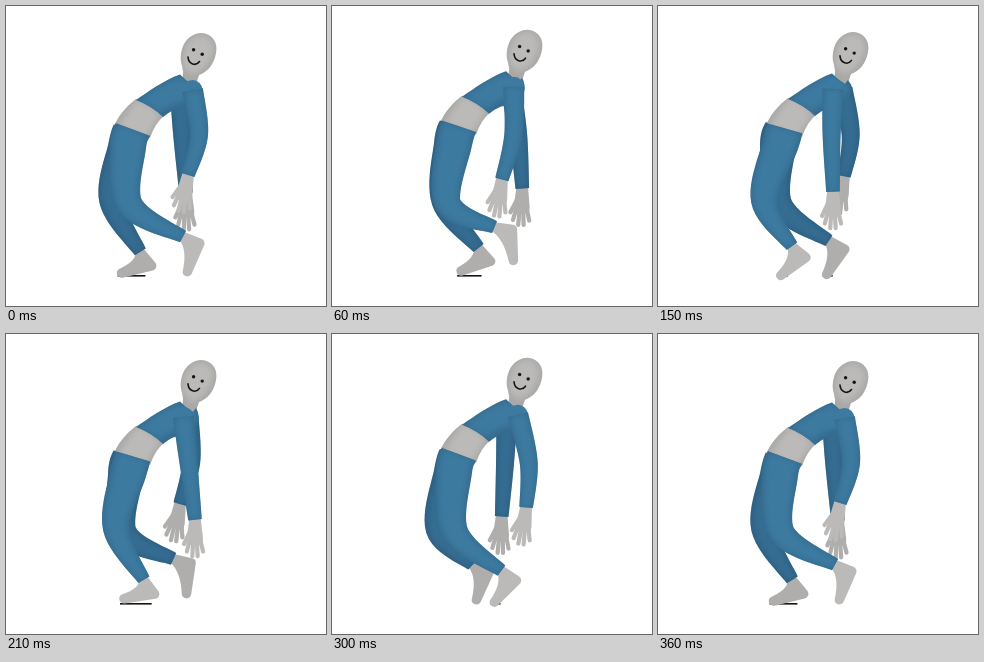
Animation, 320 px wide and 300 px high, one loop 390 ms. Source, as an HTML page with a canvas:

```html
<!DOCTYPE html>
<html lang="en">
<head>
<meta charset="utf-8">
<title>Backward-leaning walk</title>
<style>
  html, body { margin: 0; width: 100%; height: 100%; overflow: hidden; background: #fff; }
  canvas { display: block; }
</style>
</head>
<body>
<canvas id="stage" width="320" height="300"></canvas>
<script>
const ctx = document.getElementById('stage').getContext('2d');
const STEP = 30, STEPS = 13, CYCLE = 360;
const INK = '#151515';

// The far side lags half a cycle and swings a little less.
const NEAR = {
  lag: 0, shift: 0, reach: 1,
  cloth: { edge: '#346a8d', core: '#3d7aa0' },
  skin: { edge: '#a9a8a6', core: '#bbbab8' }
};
const FAR = {
  lag: Math.PI, shift: -2, reach: 0.85,
  cloth: { edge: '#2c5d7e', core: '#356c91' },
  skin: { edge: '#9d9c9a', core: '#afaeac' }
};

const { cos, sin, PI } = Math;
const rad = degrees => degrees * PI / 180;
const mix = (a, b, u) => a.map((v, i) => v + (b[i] - v) * u);
const polar = ([x, y], length, angle) => [x + length * cos(angle), y + length * sin(angle)];

function hermite(a, b, ma, mb, u) {
  const v = u * u, w = v * u;
  return (2 * w - 3 * v + 1) * a + (w - 2 * v + u) * ma
       + (3 * v - 2 * w) * b + (w - v) * mb;
}

// Outline of a tapered limb through [x, y, radius] points.
function tube(points, scale = 1) {
  const mid = [], n = points.length;
  for (let i = 0; i < n - 1; i++) {
    const p = points[Math.max(i - 1, 0)], a = points[i];
    const b = points[i + 1], q = points[Math.min(i + 2, n - 1)];
    for (let s = i ? 1 : 0; s <= 12; s++) {
      mid.push(a.map((v, c) => hermite(v, b[c], (b[c] - p[c]) / 2, (q[c] - v) / 2, s / 12)));
    }
  }
  const side = sign => mid.map(([x, y, r], i) => {
    const a = mid[Math.max(i - 1, 0)], b = mid[Math.min(i + 1, mid.length - 1)];
    const dx = b[0] - a[0], dy = b[1] - a[1], k = sign * r * scale / Math.hypot(dx, dy);
    return [x - dy * k, y + dx * k];
  });
  const path = new Path2D();
  [...side(1), ...side(-1).reverse()].forEach(point => path.lineTo(...point));
  path.closePath();
  return path;
}

// Flat fill with a soft lighter core.
function shade(path, color, core) {
  ctx.fillStyle = color.edge;
  ctx.fill(path);
  ctx.save();
  ctx.clip(path);
  ctx.filter = 'blur(3px)';
  ctx.fillStyle = color.core;
  ctx.fill(core);
  ctx.restore();
}

const limb = (points, color) => shade(tube(points), color, tube(points, 0.85));

function disc([x, y], r, color) {
  ctx.fillStyle = color;
  ctx.beginPath();
  ctx.arc(x, y, r, 0, PI * 2);
  ctx.fill();
}

function line(color, width, path) {
  ctx.strokeStyle = color;
  ctx.lineWidth = width;
  ctx.lineCap = ctx.lineJoin = 'round';
  ctx.stroke(path);
}

// The cuff travels a lopsided loop; the foot pitches up as it trails.
function legPose(side, phase) {
  const p = phase + side.lag;
  const x = (mean, amp, lead) => mean + side.shift + side.reach * amp * cos(p + lead);
  const knee = [x(115.5, 9.4, 0.44), 197 + 2 * cos(p)];
  const cuff = [x(155, 22.4, 0.18), 234.5 - 10.8 * cos(p - 0.79) + 4 * cos(2 * p + 0.32)];
  const pitch = 50 + 38 * cos(p - 0.8) - 10 * cos(2 * p);
  const heel = polar(cuff, 18, rad(58 - 0.55 * pitch));
  const toe = polar(heel, 31, rad(180 - pitch));
  const planted = cos(p - rad(240)) > -0.25;
  return { knee, cuff, heel, toe, pitch, planted };
}

// The arm swings against the leg and folds at the back of the swing.
function armPose(side, phase, bob) {
  const p = phase + side.lag;
  const x = (mean, amp, lead) => mean + side.shift + side.reach * amp * cos(p + lead);
  const shoulder = [x(181, 6, 0.4), 84 + bob];
  const elbow = [x(185, 12, 0.84), 129];
  const wrist = [x(182, 14, PI / 2), 178 - 9 * cos(p)];
  const tip = [wrist[0] - 3.5 - 4 * cos(p), wrist[1] + 39];
  return { shoulder, elbow, wrist, tip };
}

function shadow({ toe, pitch, planted }) {
  if (!planted) return;
  ctx.fillStyle = INK;
  ctx.fillRect(toe[0] - 4, 269, Math.max(10, 38 - 0.75 * pitch), 1.6);
}

function foot({ cuff, heel, toe }, skin) {
  const instep = mix(mix(cuff, toe, 0.5), heel, 0.5);
  const path = new Path2D();
  path.moveTo(...cuff);
  path.lineTo(...heel);
  path.lineTo(...toe);
  path.quadraticCurveTo(...instep, ...cuff);
  path.closePath();
  ctx.fillStyle = skin.core;
  ctx.fill(path);
  line(skin.core, 9.5, path);
}

function leg(side, pose, bob) {
  foot(pose, side.skin);
  limb([
    [127 + side.shift, 123.5 + bob, 18],
    [122 + side.shift, 141 + bob, 18],
    [...pose.knee, 13],
    [...pose.cuff, 6.4]
  ], side.cloth);
}

function hand(wrist, tip, skin) {
  const length = Math.hypot(tip[0] - wrist[0], tip[1] - wrist[1]);
  const finger = (x1, y1, x2, y2) => line(skin.core, 4.2, new Path2D(`M${x1} ${y1}L${x2} ${y2}`));
  ctx.save();
  ctx.translate(...wrist);
  ctx.rotate(Math.atan2(tip[1] - wrist[1], tip[0] - wrist[0]));
  for (let k = -1.5; k <= 1.5; k++) {
    finger(length * 0.5, k * 3.4, length * (1 - 0.06 * k * k) - 2, k * 5.4);
  }
  finger(length * 0.3, 5, length * 0.62, 11);
  ctx.fillStyle = skin.core;
  ctx.fill(tube([[-1, 0, 5.8], [length * 0.25, 0, 7], [length * 0.5, 0, 8], [length * 0.64, 0, 6.5]]));
  ctx.restore();
}

function arm(side, { shoulder, elbow, wrist, tip }) {
  hand(wrist, tip, side.skin);
  disc(shoulder, 10, side.cloth.core);
  limb([[...shoulder, 10.5], [...elbow, 9], [...wrist, 6.8]], side.cloth);
}

const BELLY = new Path2D('M109 118C113 109 121 100 130 93Q148 97 158 110Q149 117 144 132Q126 128 109 118Z');
const BELLY_CORE = new Path2D('M112 120L131 93Q147 99 154 110L139 132Z');
const SHIRT = new Path2D('M130 94C142 86 158 74 174 68.500Q180 75 187 79L190 75Q194 82 192 90Q190 98 180 101Q166 103 157 111Q146 100 130 94Z');
const SHIRT_CORE = new Path2D('M132 95C146 84 160 74 175 70L192 82L184 94Q166 96 154 107Z');
const HEAD = new Path2D('M176.500 72Q178 66 176 60C174 54 174.500 48 176 43C179 33 187 27 196 27C207 28 212 37 210 47C208 59 201 66 193 69L189 81Z');
const HEAD_CORE = new Path2D('M178 62C174 46 184 28 196 29C206 31 209 40 206 48C203 59 195 65 187 69Z');
const SMILE = new Path2D('M182 51C182.500 58.500 190 60.500 193.500 55.500');

function torso(bob) {
  ctx.save();
  ctx.translate(0, bob);
  shade(BELLY, NEAR.skin, BELLY_CORE);
  shade(HEAD, NEAR.skin, HEAD_CORE);
  disc([187.6, 43.8], 1.7, INK);
  disc([196.2, 48.2], 1.7, INK);
  line(INK, 1.6, SMILE);
  shade(SHIRT, NEAR.cloth, SHIRT_CORE);
  ctx.restore();
}

function draw(t) {
  const phase = t / CYCLE * PI * 2;
  const bob = 2.2 * (cos(2 * phase) - 1);
  const farLeg = legPose(FAR, phase), nearLeg = legPose(NEAR, phase);
  ctx.fillStyle = '#fff';
  ctx.fillRect(0, 0, 320, 300);
  shadow(farLeg);
  shadow(nearLeg);
  arm(FAR, armPose(FAR, phase, bob));
  leg(FAR, farLeg, bob);
  torso(bob);
  leg(NEAR, nearLeg, bob);
  arm(NEAR, armPose(NEAR, phase, bob));
}

// Thirteen held poses; the last one repeats the first.
function tick(now) {
  draw(Math.floor(now / STEP) % STEPS * STEP % CYCLE);
  requestAnimationFrame(tick);
}
tick(0);
</script>
</body>
</html>
```
